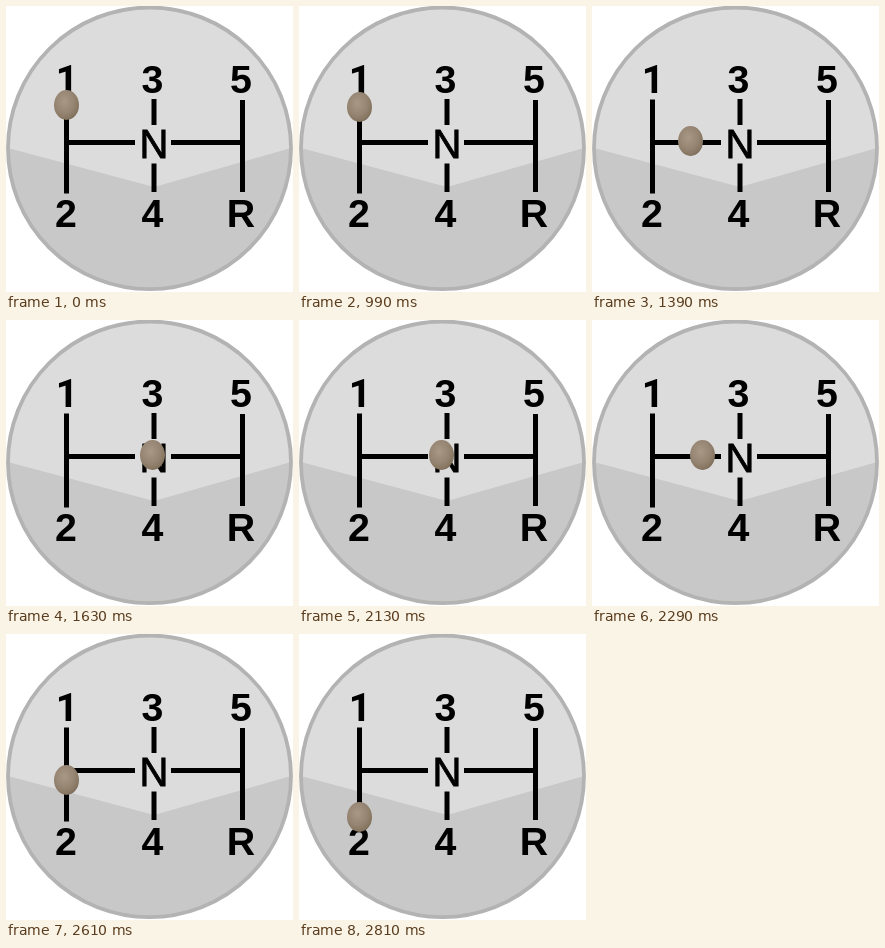
An HTML page for the animation above (4810 ms loop, 287 px wide and 286 px high).

```html
<!DOCTYPE html>
<html lang="en">
<head>
<meta charset="utf-8">
<title>Gear shift</title>
<style>
  html, body { margin: 0; width: 100%; height: 100%; overflow: hidden; background: #fff; }
  svg { display: block; width: 100vw; height: 100vh; }
  text { font: bold 39.3px "Liberation Sans", Arial, sans-serif; text-anchor: middle; }
  .one { font-family: Roboto, sans-serif; }
  .neutral { font-weight: normal; font-size: 40px; stroke: #000; stroke-width: .8px; }
</style>
</head>
<body>
<svg viewBox="0 0 287 286">
  <defs>
    <radialGradient id="shade" cx=".42" cy=".38" r=".66">
      <stop offset="0" stop-color="#a89886"/>
      <stop offset=".6" stop-color="#958471"/>
      <stop offset=".9" stop-color="#85745f"/>
      <stop offset="1" stop-color="#6c5d4d"/>
    </radialGradient>
    <clipPath id="disc"><ellipse cx="143.5" cy="142.3" rx="141.5" ry="140.8"/></clipPath>
  </defs>
  <g clip-path="url(#disc)">
    <path fill="#dcdcdc" d="M0 0H287V286H0z"/>
    <path fill="#c8c8c8" d="M0 141.5L148 181L287 141.5V286H0z"/>
  </g>
  <ellipse cx="143.5" cy="142.3" rx="141.5" ry="140.8" fill="none" stroke="#b3b3b3" stroke-width="3.8"/>
  <path fill="none" stroke="#000" stroke-width="5"
    d="M60.5 93.5V187.5M236.5 94V186M148 93V119M148 157.5V186M60.5 136.5H129M165 136.5H236.5"/>
  <text class="one" x="61" y="87">1</text>
  <text x="146.5" y="87">3</text>
  <text x="235" y="87">5</text>
  <text x="60" y="221">2</text>
  <text x="146.5" y="221">4</text>
  <text x="235" y="221">R</text>
  <text class="neutral" x="148" y="152">N</text>
  <ellipse id="knob" rx="12.5" ry="15" fill="url(#shade)"/>
</svg>
<script>
const LOOP = 4810, TICK = 20;
const LEFT = 60.5, MID = 146.5, FIRST = 99, NEUTRAL = 135, SECOND = 183;
const SPEED_X = 4, SPEED_Y = 3.4, SPEED_OUT = 3.7;
const knob = document.getElementById("knob");

// Whole ticks since a shift began, held at its last tick.
const ticks = (t, begin, last) =>
  Math.min(last, Math.max(0, Math.floor((t - begin) / TICK)));

function place(t) {
  const into = ticks(t, 970, 33), out = ticks(t, 2110, 35);
  let x, y;
  if (out === 0) { // first gear down, then across to neutral
    x = Math.max(LEFT, MID - SPEED_X * (33 - into));
    y = Math.min(NEUTRAL, Math.max(FIRST, NEUTRAL - SPEED_Y * (11 - into)));
  } else { // back across, then down to second gear
    x = Math.max(LEFT, MID - SPEED_X * out);
    y = Math.max(NEUTRAL, SECOND - SPEED_OUT * (35 - out));
  }
  knob.setAttribute("cx", x);
  knob.setAttribute("cy", y);
}

const start = performance.now();
function frame() {
  place((performance.now() - start) % LOOP);
  requestAnimationFrame(frame);
}
frame();
</script>
</body>
</html>
```
